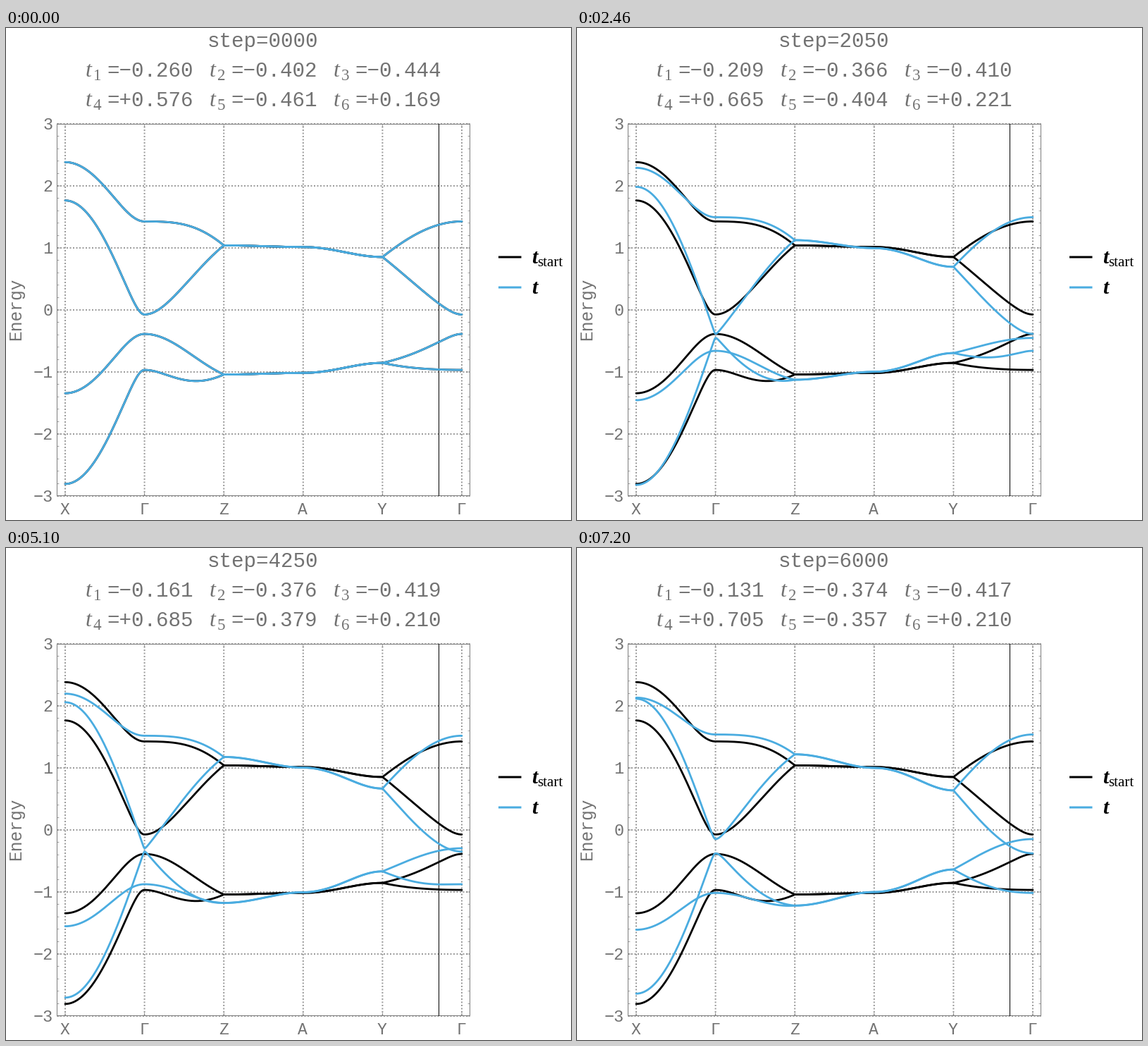
Recreate the animation shown at these times as a matplotlib script. Size 802 by 698 pixels, loop 7260 ms.

```python
import numpy as np
import matplotlib
import matplotlib.pyplot as plt
from matplotlib.animation import FuncAnimation

W, H, DPI = 802, 698, 64
PT = 72 / DPI
FRAMES, INTERVAL = 121, 60

GRAY, GRID, EDGE, BLUE = "#727272", "#9c9c9c", "#7c7c7c", "#4aace0"
MONO, SERIF = "Liberation Mono", "Liberation Serif"
LEFT, RIGHT, TOP, BOTTOM = 72.5, 658.5, 136.5, 663.5
X0, SPAN = 84, 112.6

# Hopping amplitudes t1..t6 along the optimisation
T_START = np.array([-0.260, -0.402, -0.444, 0.576, -0.461, 0.169])
KNOTS = np.array([16, 41, 67, 85, 97, 120])
T_KNOTS = np.array([
    [-0.224, -0.366, -0.410, 0.652, -0.417, 0.221],
    [-0.209, -0.366, -0.410, 0.665, -0.404, 0.221],
    [-0.185, -0.372, -0.416, 0.675, -0.392, 0.215],
    [-0.161, -0.376, -0.419, 0.685, -0.379, 0.210],
    [-0.146, -0.376, -0.420, 0.693, -0.370, 0.208],
    [-0.131, -0.374, -0.417, 0.705, -0.357, 0.210],
])
SLOPES = np.gradient(T_KNOTS, KNOTS, axis=0)
T_DRIFT = T_KNOTS[0] - KNOTS[0] * SLOPES[0]


def hoppings(n):
    """Slow drift (cubic Hermite) after a quick initial relaxation."""
    if n <= KNOTS[0]:
        t = T_DRIFT + n * SLOPES[0]
    else:
        i = min(np.searchsorted(KNOTS, n) - 1, len(KNOTS) - 2)
        h = KNOTS[i + 1] - KNOTS[i]
        u = (n - KNOTS[i]) / h
        t = ((1 + 2 * u) * (1 - u) ** 2 * T_KNOTS[i]
             + u * (1 - u) ** 2 * h * SLOPES[i]
             + u * u * (3 - 2 * u) * T_KNOTS[i + 1]
             + u * u * (u - 1) * h * SLOPES[i + 1])
    return t + (T_START - T_DRIFT) * np.exp(-n / 2)


# Path X, Gamma, Z, A, Y, Gamma through the Brillouin zone
CORNERS = np.pi * np.array([[1, 0, 0], [0, 0, 0], [0, 0, 1],
                            [0, 1, 1], [0, 1, 0], [0, 0, 0]])
S = np.linspace(0, 5, 601)
KX, KY, KZ = (np.interp(S, range(6), CORNERS[:, j]) for j in range(3))


def bands(t):
    t1, t2, t3, t4, t5, t6 = t
    a = t2 + t3 * np.exp(1j * KX) + t6 * np.exp(1j * KZ)
    b = 2 * t1 * np.cos(KZ / 2) * np.exp(0.5j * KY)
    c = 2 * np.cos(KY / 2) * np.exp(0.5j * KZ) * (t4 + t5 * np.exp(1j * KX))
    ham = np.zeros((len(S), 4, 4), complex)
    ham[:, 0, 1] = ham[:, 2, 3] = a
    ham[:, 0, 2], ham[:, 1, 3] = b, b.conj()
    ham[:, 0, 3], ham[:, 1, 2] = c, c.conj()
    ham += ham.conj().transpose(0, 2, 1)
    return np.linalg.eigvalsh(ham).T


def y_px(energy):
    return 400 - 88 * energy


fig = plt.figure(figsize=(W / DPI, H / DPI), dpi=DPI, facecolor="white")
ax = fig.add_axes([0, 0, 1, 1])
ax.set(xlim=(0, W), ylim=(H, 0))
ax.axis("off")


def line(xs, ys, color, width, **kw):
    return ax.plot(xs, ys, color=color, lw=width * PT, snap=False, **kw)[0]


def label(x, y, s, size, font=MONO, color=GRAY, **kw):
    kw.setdefault("va", "baseline")
    return ax.text(x, y, s, fontsize=size * PT, family=font, color=color, **kw)


def draw_frame():
    dots = dict(ls=(0, (1, 1.25)), dash_capstyle="butt", zorder=1)
    for i, name in enumerate("XΓZAYΓ"):
        x = X0 + SPAN * i
        line([x, x], [BOTTOM, TOP], GRID, 2, **dots)
        line([x, x], [BOTTOM, BOTTOM - 4], EDGE, 0.7)
        line([x, x], [TOP, TOP + 4], EDGE, 0.7)
        label(x - 0.5, 690, name, 23, ha="center")
    for e in range(-3, 4):
        y = y_px(e)
        line([LEFT, RIGHT], [y, y], GRID, 2, **dots)
        label(66.5, y + 7.5, str(e).replace("-", "−"), 23.5, ha="right")
    for i in range(-15, 16):
        y, size = y_px(i / 5), 4 if i % 5 == 0 else 2.5
        line([LEFT, LEFT + size], [y, y], EDGE, 0.7)
        line([RIGHT, RIGHT - size], [y, y], EDGE, 0.7)
    line([LEFT, RIGHT, RIGHT, LEFT, LEFT],
         [TOP, TOP, BOTTOM, BOTTOM, TOP], EDGE, 1)
    line([614.5, 614.5], [TOP, BOTTOM], "black", 1, zorder=2)
    label(26, 398.5, "Energy", 24.5, rotation=90, ha="right", va="center")


def draw_legend():
    for y, color in ((325, "black"), (368, BLUE)):
        line([699, 731.5], [y, y], color, 3, solid_capstyle="butt")
        label(746, y + 9, "t", 30, SERIF, "black", style="italic",
              weight="bold")
    label(754, 338.5, "start", 21, SERIF, "black")


def draw_curves(color, z):
    return [line(X0 + SPAN * S, y_px(e), color, 2.8, zorder=z,
                 solid_capstyle="round", solid_joinstyle="round")
            for e in bands(T_START)]


draw_frame()
draw_legend()
draw_curves("black", 4)
curves = draw_curves(BLUE, 5)

step = label(364.5, 27, "", 29.2, ha="center")
values = []
for i in range(6):
    x, y = 113 + 176 * (i % 3), 69 + 42 * (i // 3)
    label(x, y, "t", 32, SERIF, style="italic")
    label(x + 11, y + 5, str(i + 1), 23, SERIF)
    values.append(label(x + 30.5, y, "", 29.2))


def update(n):
    t = hoppings(n)
    step.set_text(f"step={50 * n:04d}")
    for text, v in zip(values, t):
        text.set_text(f"={v:+.3f}".replace("-", "−"))
    for curve, e in zip(curves, bands(t)):
        curve.set_ydata(y_px(e))
    return [step, *values, *curves]


anim = FuncAnimation(fig, update, frames=FRAMES, interval=INTERVAL,
                     repeat=True, repeat_delay=0, blit=False)
plt.show()
```
